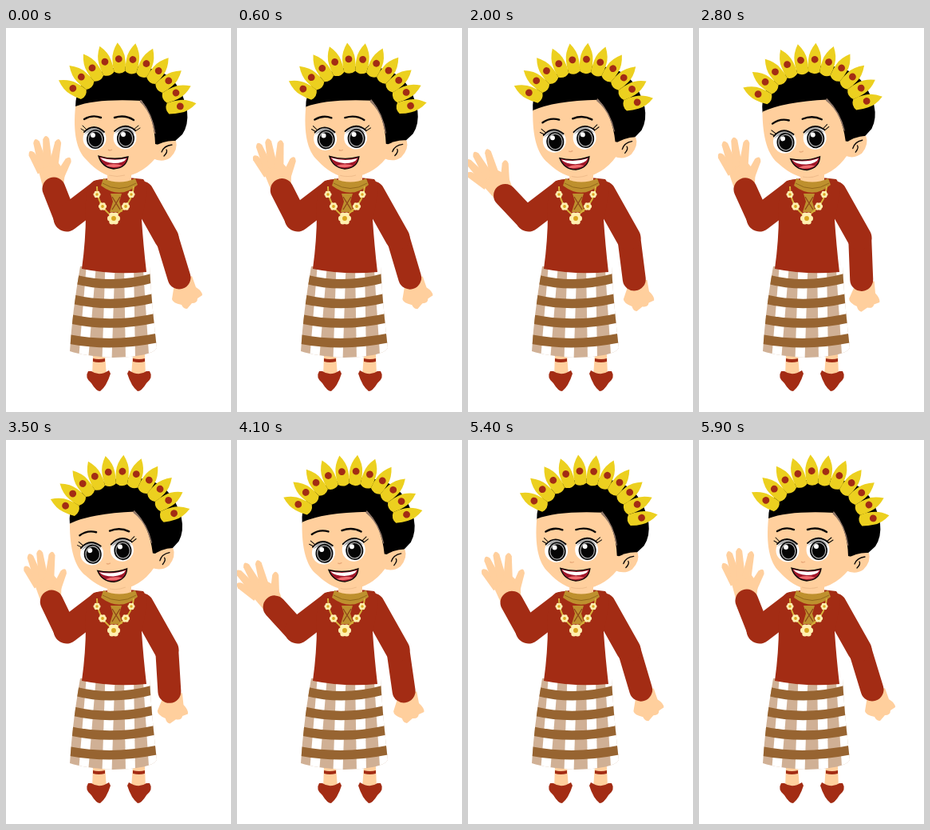
These frames come from a looping animation (282x480 px, 6000 ms). An HTML page:

```html
<!DOCTYPE html>
<html lang="en">
<head>
<meta charset="utf-8">
<title>Waving girl</title>
<style>
  html, body { margin: 0; width: 100%; height: 100%; overflow: hidden; background: #fff; }
  svg { display: block; width: 100vw; height: 100vh; }
  .red { fill: #a32c14; }
  .skin { fill: #ffcf9d; }
  .gold { fill: #be902e; }
  .sleeve { stroke: #a32c14; fill: none; stroke-linecap: round; stroke-linejoin: round; }
  .ink { stroke: #080606; fill: none; stroke-linecap: round; }
</style>
</head>
<body>
<svg viewBox="0 0 282 480">
  <defs>
    <clipPath id="skirtClip">
      <path d="M93 298L180 298Q182 340 189 400Q183 411 134 412Q98 410 80 404Q83 355 93 298Z"/>
    </clipPath>
    <g id="eye">
      <ellipse rx="14.5" ry="14.5" fill="#fff"/>
      <path d="M-13 -5Q0 -22 13 -5Q0 -13 -13 -5Z" fill="#aaa"/>
      <ellipse cx="1" cy="1" rx="11" ry="12" fill="#050505"/>
      <ellipse cx="1" cy="1" rx="8.8" ry="9.8" fill="none" stroke="#aaa" stroke-width="1.3"/>
      <circle cx="-2" cy="-4" r="3" fill="#fff"/>
    </g>
    <g id="shoe">
      <path class="skin" d="M-8 -22H7L9 5H-9Z"/>
      <path class="red" d="M-8 -17Q-1 -15 7 -17V-13Q-1 -11 -8 -13Z"/>
      <path class="red" d="M-14 -1Q-19 7 -10 14Q-4 24 1 24Q9 18 14 2L12 -2Q0 6 -10 -1Z"/>
    </g>
  </defs>

  <use href="#shoe" transform="translate(117 430)"/>
  <use href="#shoe" transform="translate(166 430) scale(-1 1)"/>

  <g clip-path="url(#skirtClip)">
    <rect x="75" y="295" width="120" height="120" fill="#d0b095"/>
    <g id="columns" stroke="#fff" stroke-width="12"></g>
    <g id="bands" fill="none" stroke="#976431" stroke-width="11.5"></g>
  </g>

  <g id="rightArm">
    <path class="skin" d="M211 320L233 310L238 324Q246 329 246 334L240 338Q240 344 233 344L227 351Q222 351 220 346Q209 344 208 339Z"/>
    <path class="sleeve" stroke-width="29" d="M202 263L217 312"/>
  </g>
  <path class="sleeve" stroke-width="31" d="M170 207L201 262"/>

  <g id="leftArm">
    <g id="leftHand">
      <path class="skin" d="M39 172Q53 159 66 169L74 180L72 198H46Z"/>
      <g id="fingers" class="skin"></g>
    </g>
    <path class="sleeve" stroke-width="29" d="M75 239L60 201"/>
  </g>
  <path class="sleeve" stroke-width="33" d="M118 206L76 238"/>

  <path class="red" d="M110 191Q140 184 172 189Q180 196 170 240Q172 270 176 305Q135 309 95 301Q100 265 100 232Q98 200 110 191Z"/>

  <path class="skin" d="M127 172H157V193Q142 201 127 193Z"/>
  <path class="gold" d="M122 188Q142 197 162 188L165 196Q143 215 119 197Z"/>
  <path d="M121 194Q142 207 163 194" fill="none" stroke="#94681c" stroke-width="1"/>
  <path class="gold" d="M131 207H145L142 217L146 230H130L134 217Z"/>
  <path d="M133 211L143 227M143 211L133 227" stroke="#8e4419" stroke-width="1.3"/>
  <path d="M114 198Q114 222 134 236Q158 222 160 198" fill="none" stroke="#d9b23c" stroke-width="2"/>
  <g id="flowers"></g>

  <g id="head">
    <path d="M87 99Q87 66 117 55Q152 42 187 52Q219 62 227 104Q229 121 221 133L210 143L190 155L120 110Z" fill="#000"/>
    <path class="skin" d="M87 98C84 130 88 153 101 165Q118 184 138 187Q168 186 187 163L195 147L187 145Q186 111 170 91Q114 88 87 98Z"/>
    <path class="skin" d="M184 149Q198 140 213 141Q216 152 206 162Q196 169 184 163Z"/>
    <path class="ink" stroke-width="1.3" d="M195 155Q198 147 208 146M201 152Q203 155 198 160"/>
    <path d="M169 90Q184 108 187 132L183 116Q178 101 168 92Z" fill="#8d7567" stroke="#8d7567"/>
    <g id="crown"></g>

    <path class="ink" stroke-width="2.4" d="M98 114Q108 108 119 112M136 112Q149 108 160 115"/>
    <use href="#eye" x="111" y="138"/>
    <use href="#eye" x="149" y="137"/>
    <path class="ink" stroke-width="1.8" d="M98 130Q110 118 123 130M136 129Q149 117 162 128"/>
    <path class="ink" stroke-width="1" d="M99 129L94 126M101 127L96 122M160 127L166 122M162 129L168 125"/>
    <path d="M128 152Q130 154 133 152" fill="none" stroke="#e8a878" stroke-width="1.3"/>

    <path d="M116 160Q135 166 153 161Q151 175 135 176Q120 174 116 160Z" fill="#a3182a"/>
    <path d="M118 162Q135 167 151 163Q148 169 135 169Q123 168 118 162Z" fill="#fff"/>
    <path d="M124 172Q135 168 146 172Q135 176 124 172Z" fill="#ef6d70"/>
    <path class="ink" stroke-width="1.3" d="M116 160Q135 166 153 161Q151 175 135 176Q120 174 116 160Z"/>
    <path d="M129 184Q139 187 149 184" fill="none" stroke="#f0bd8c"/>
  </g>
</svg>
<script>
const $ = id => document.getElementById(id);
const LOOP = 6000, STEP = 100;

function fill(id, count, part) {
  $(id).innerHTML = Array.from({ length: count }, (_, i) => part(i)).join('');
}

fill('crown', 11, i =>
  `<g transform="translate(147 111) rotate(${-60.6 + i * 14.02})">
    <path d="M0 -93Q-8 -82 -8 -72Q-8.5 -65 -7 -57Q0 -52 7 -57Q8.5 -65 8 -72Q8 -82 0 -93Z" fill="#ecd01f"/>
    <circle cy="-72.5" r="4.4" class="red"/></g>`);

fill('columns', 4, i => `<path d="M${107 + i * 23.5} 295L${97 + i * 29.5} 415"/>`);

fill('bands', 4, i => {
  const y = 314.5 + i * 24.6, spread = i * 4;
  return `<path d="M${88 - spread} ${y}Q135 ${y + 12} ${188 + spread} ${y - 3}"/>`;
});

// Fingers: base x, y, tip x, y
const fingers = [[43, 176, 30, 154], [46, 171, 37, 139], [52, 168, 50, 135], [60, 170, 66, 139], [68, 184, 80, 162]];
fill('fingers', fingers.length, i => {
  const [x, y, tx, ty] = fingers[i];
  const len = Math.hypot(tx - x, ty - y);
  const deg = Math.atan2(tx - x, y - ty) * 180 / Math.PI;
  return `<path transform="translate(${x} ${y}) rotate(${deg})" d="M-6 4L-4 ${4 - len}Q0 ${-len - 4} 4 ${4 - len}L6 4Z"/>`;
});

const flowers = [[114, 208, 4], [121, 223, 4.5], [135, 238, 7], [150, 223, 4.5], [157, 208, 4]];
fill('flowers', flowers.length, i => {
  const [x, y, r] = flowers[i];
  let petals = '';
  for (let k = 0; k < 6; k++) {
    const a = k * Math.PI / 3;
    petals += `<circle cx="${x + r * .65 * Math.cos(a)}" cy="${y + r * .65 * Math.sin(a)}" r="${r * .5}" fill="#fff0b0"/>`;
  }
  return petals + `<circle cx="${x}" cy="${y}" r="${r * .42}" fill="#d9a520"/>`;
});

const ease = p => p < .5 ? 4 * p ** 3 : 1 - 4 * (1 - p) ** 3;

// Wave keys: [time, amount]
const wave = [[0, 0], [1550, 1], [3100, .1], [4600, 1], [LOOP, 0]];

function waveAt(t) {
  const i = wave.findIndex(k => k[0] > t);
  const [t0, a] = wave[i - 1], [t1, b] = wave[i];
  return a + (b - a) * ease((t - t0) / (t1 - t0));
}

function turn(id, deg, x, y) {
  $(id).setAttribute('transform', `rotate(${deg.toFixed(3)} ${x} ${y})`);
}

function draw(t) {
  const sway = (1 - Math.cos(2 * Math.PI * t / LOOP)) / 2;
  const lift = waveAt(t);
  turn('head', -5.9 * sway, 150, 175);
  turn('rightArm', 15 * sway ** 1.5, 201, 262);
  turn('leftArm', -24 * lift, 75, 240);
  turn('leftHand', -6 * lift, 60, 196);
}

const start = performance.now();
function tick() {
  const t = (performance.now() - start) % LOOP;
  draw(Math.floor(t / STEP) * STEP);
  requestAnimationFrame(tick);
}
tick();
</script>
</body>
</html>
```
